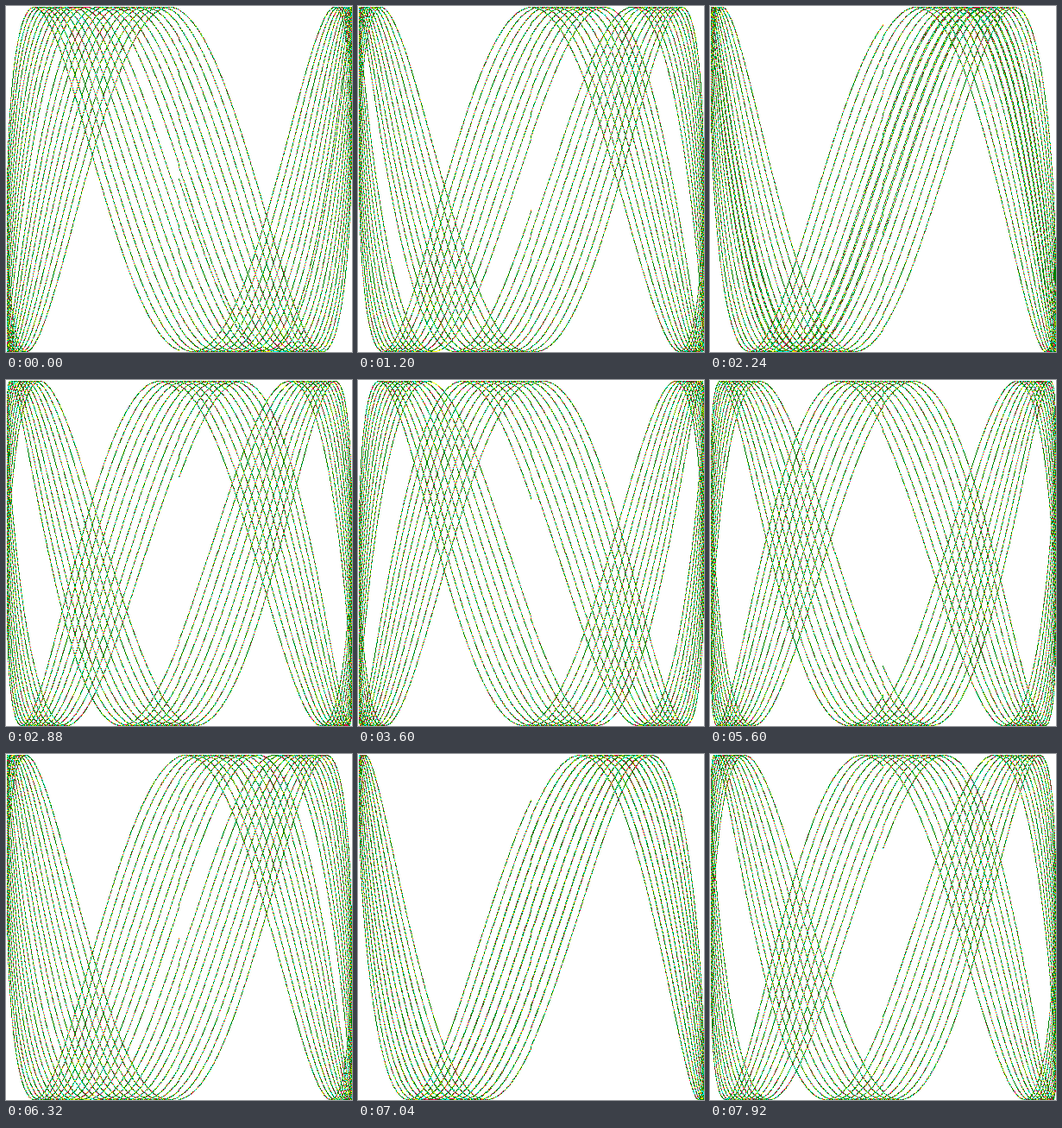
Write an HTML page with a canvas that moves like this. It is 401 px wide and 401 px high and loops after 8 s.

```html
<!DOCTYPE html>
<html>
<head>
<meta charset="utf-8">
<title>Lissajous</title>
<style>
html, body { margin: 0; width: 100%; height: 100%; overflow: hidden; background: #fff; }
canvas { display: block; }
</style>
</head>
<body>
<canvas id="stage" width="401" height="401"></canvas>
<script>
const R = 200, SIDE = 2 * R + 1;
const CYCLES = 10, STEP = 0.001, FREQ = 3.023301439898098;
const FRAMES = 100, DELAY = 80;
// Pixel colours as 0xAABBGGRR
const GREEN = 0xff008000, CYAN = 0xffffff00, RED = 0xff5500ff, YELLOW = 0xff00ffff;
const COLORS = [GREEN, CYAN, GREEN, RED, GREEN, YELLOW];

const ctx = document.getElementById('stage').getContext('2d');
const image = ctx.createImageData(SIDE, SIDE);
const pixels = new Uint32Array(image.data.buffer);
const place = v => R + Math.trunc(v * R + 0.5);

function draw(phase) {
  pixels.fill(0xffffffff);
  const count = CYCLES * 2 * Math.PI / STEP;
  for (let i = 0; i < count; i++) {
    const t = i * STEP;
    const x = place(Math.sin(t)), y = place(Math.sin(t * FREQ + phase));
    pixels[y * SIDE + x] = COLORS[i % COLORS.length];
  }
  ctx.putImageData(image, 0, 0);
}

let shown = -1;
function tick() {
  const n = Math.floor(performance.now() / DELAY) % FRAMES;
  if (n !== shown) draw((shown = n) * 0.1);
  requestAnimationFrame(tick);
}
tick();
</script>
</body>
</html>
```
